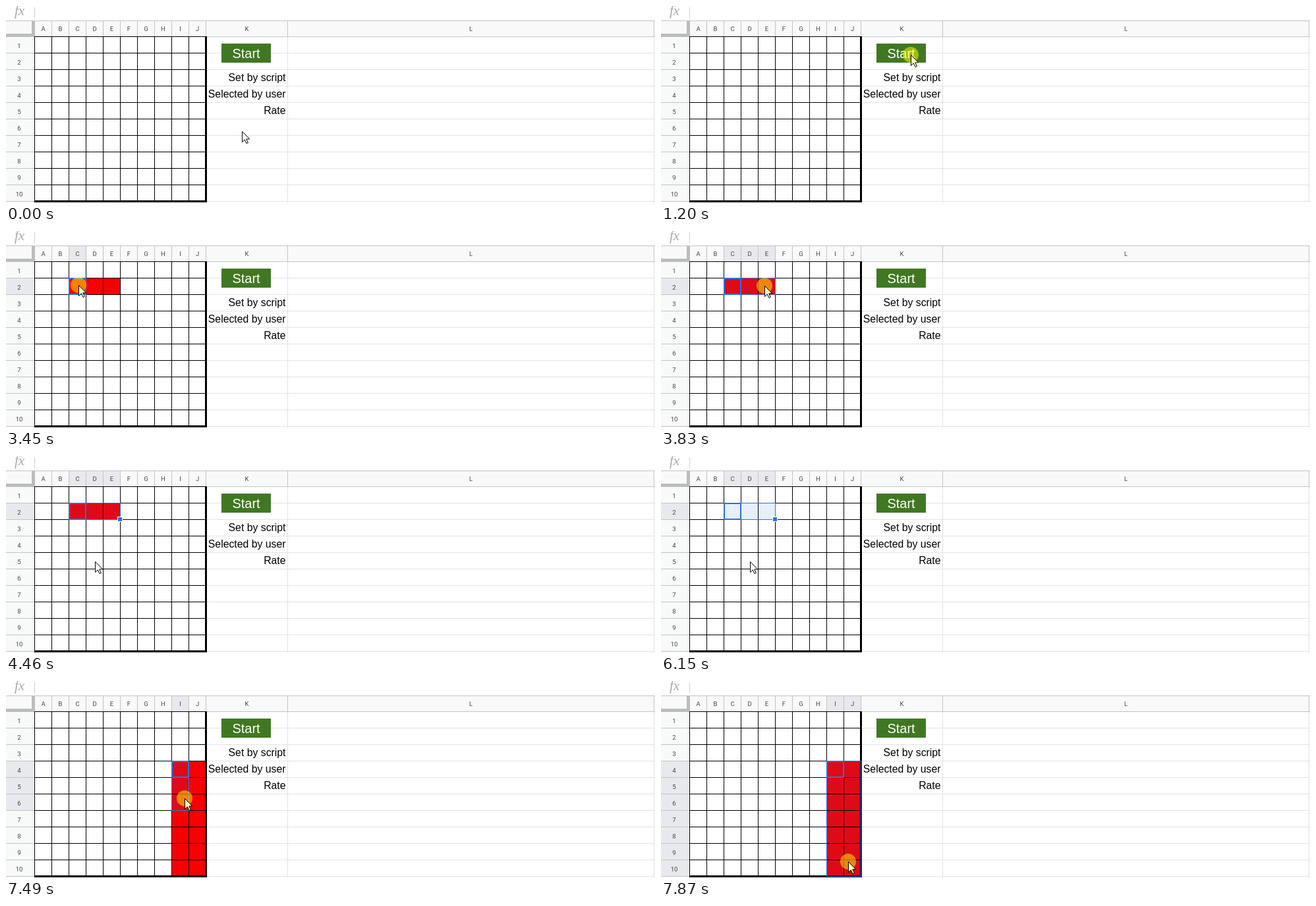
Write an HTML page that moves like this. It is 985 by 299 pixels and loops after 8 s.

```html
<!DOCTYPE html>
<html lang="en">
<head>
<meta charset="utf-8">
<title>Spreadsheet range selection</title>
<style>
  html, body { margin: 0; width: 100%; height: 100%; overflow: hidden; background: #fff; }
  svg { display: block; width: 985px; height: 299px; }
  .crisp { shape-rendering: crispEdges; }
  .head { font: 9.5px Roboto, Arial, sans-serif; fill: #444; text-anchor: middle; }
  .cell { font: 15.8px "Liberation Sans", Arial, sans-serif; text-anchor: end; }
  .button { font: 20px "Liberation Sans", Arial, sans-serif; fill: #fff; text-anchor: middle; }
  .fx { font: italic 21px "Liberation Serif", Times, serif; fill: #aaa; }
</style>
</head>
<body>
<svg id="stage" viewBox="0 0 985 299"></svg>
<script>
const LOOP = 8000, COLS = 10, ROWS = 10, CW = 26, RH = 25;
const BLUE = '#2b6fe3', HEAD = '#f8faf9', HEAD_ON = '#e8e9ee', LINE = '#c2c4c3', GRID = '#e2e3e3';
const stage = document.getElementById('stage');
const colX = c => 43 + c * CW;
const rowY = r => 46 + r * RH;

function add(tag, attrs, text, parent = stage) {
  const el = document.createElementNS('http://www.w3.org/2000/svg', tag);
  for (const k in attrs) el.setAttribute(k, attrs[k]);
  if (text !== undefined) el.textContent = text;
  return parent.appendChild(el);
}
const rect = (x, y, width, height, fill) => add('rect', { x, y, width, height, fill, class: 'crisp' });
const label = (cls, x, y, text) => add('text', { class: cls, x, y }, text);
const show = (el, on) => el.setAttribute('visibility', on ? 'visible' : 'hidden');
function place(el, x, y, width, height) {
  Object.entries({ x, y, width, height }).forEach(([k, v]) => el.setAttribute(k, v));
}

// Formula bar and headers
label('fx', 13, 14, 'fx');
rect(43, 2, 1, 17, '#cfcfcf');
rect(0, 23, 984, 23, HEAD);
rect(0, 46, 43, 253, HEAD);
const colHeads = [], rowHeads = [];
for (let c = 0; c < COLS; c++) colHeads.push(rect(colX(c) + 1, 23, CW - 1, 23, HEAD));
for (let r = 0; r < ROWS; r++) rowHeads.push(rect(0, rowY(r) + 1, 43, RH - 1, HEAD));
rect(0, 22, 985, 1, LINE);
rect(0, 46, 985, 1, LINE);
rect(43, 23, 1, 276, LINE);
for (let c = 1; c <= COLS; c++) rect(colX(c), 23, 1, 23, LINE);
for (let r = 1; r <= ROWS; r++) {
  rect(0, rowY(r), 43, 1, LINE);
  rect(304, rowY(r), 681, 1, GRID);
}
for (const x of [427, 983]) {
  rect(x, 23, 1, 23, LINE);
  rect(x, 47, 1, 252, GRID);
}
rect(0, 42, 44, 5, '#bcbcbc');
rect(39, 23, 5, 24, '#bcbcbc');
for (let c = 0; c < COLS; c++) label('head', colX(c) + 13.5, 38, 'ABCDEFGHIJ'[c]);
label('head', 365.5, 38, 'K');
label('head', 705.5, 38, 'L');
for (let r = 0; r < ROWS; r++) label('head', 20, rowY(r) + 17.5, r + 1);

// Column K
rect(327, 57, 75, 29, '#407822');
label('button', 364.5, 79, 'Start');
['Set by script', 'Selected by user', 'Rate'].forEach((s, i) => label('cell', 424.5, 114 + i * RH, s));

// Filled ranges and board: first column, first row, last column, last row, on, off
const fills = [[2, 1, 4, 1, 2670, 6150], [8, 3, 9, 9, 6550, LOOP]].map(([c0, r0, c1, r1, on, off]) => ({
  on, off,
  el: rect(colX(c0) + 1, rowY(r0) + 1, (c1 - c0 + 1) * CW, (r1 - r0 + 1) * RH, '#f60000')
}));
const tint = rect(0, 0, 0, 0, 'rgba(14,101,235,0.1)');
for (let c = 0; c < COLS; c++) rect(colX(c), 46, 1, 251, '#000');
for (let r = 0; r < ROWS; r++) rect(43, rowY(r), 261, 1, '#000');
rect(302, 46, 3, 252, '#000');
rect(43, 295, 262, 3, '#000');

const outline = add('rect', { fill: 'none', stroke: BLUE, class: 'crisp' });
const active = add('rect', { fill: 'none', stroke: BLUE, 'stroke-width': 2, class: 'crisp' });
const knob = add('rect', { width: 7, height: 7, fill: BLUE, stroke: '#fff', class: 'crisp' });
const pointer = add('g', {});
const glow = add('circle', { r: 12, fill: '#ff0', 'fill-opacity': 0.5 }, undefined, pointer);
const arrow = add('path', {
  d: 'M.5 .5V16.5L4.3 12.9L7 18.6L9.4 17.5L6.8 11.9H11.7Z', stroke: '#000', 'stroke-width': 1
}, undefined, pointer);

// Pointer moves: first step, last step, number of steps, x, y
const moves = [
  [730, 1040, 5, 379, 74],
  [1360, 1510, 3, 317, 105],
  [1580, 1970, 6, 181, 173],
  [2920, 3370, 7, 110, 82],
  [3530, 3680, 3, 151, 82],
  [3740, 3910, 3, 159, 83],
  [4060, 4460, 6, 135, 160],
  [6870, 7170, 5, 265, 130],
  [7330, 7660, 5, 278, 243],
  [7720, 7870, 3, 284, 274]
];
const presses = [[1120, 1280], [3450, 4060], [7250, LOOP]];
const drags = [
  { from: 3450, release: 4060, until: 7250, c: 2, r: 1 },
  { from: 7250, release: LOOP, until: LOOP, c: 8, r: 3 }
];
const ease = p => p + 0.6 * p * (1 - p) * (2 * p < 1 ? 2 * p - 0.6 : 0.6);

function pointerAt(t) {
  let x = 358, y = 190;
  for (const [a, b, n, tx, ty] of moves) {
    if (t < a) break;
    const step = Math.min(n, 1 + Math.floor((t - a) / (b - a) * (n - 1) + 1e-6));
    const p = ease(step / n);
    x += (tx - x) * p;
    y += (ty - y) * p;
  }
  return [Math.round(x), Math.round(y)];
}

function drawSelection(t) {
  const d = drags.find(d => t >= d.from && t < d.until);
  let c1 = -1, r1 = -1;
  if (d) {
    const [px, py] = pointerAt(Math.min(t, d.release - 1));
    c1 = Math.floor((px - 44) / CW);
    r1 = Math.floor((py - 47) / RH);
    const x = colX(d.c), y = rowY(d.r), w = (c1 - d.c + 1) * CW, h = (r1 - d.r + 1) * RH;
    place(outline, x + 0.5, y + 0.5, w, h);
    place(tint, x + 1, y + 1, w, h);
    place(active, x + 1, y + 1, CW - 1, RH - 1);
    place(knob, x + w - 3.5, y + h - 3.5, 7, 7);
  }
  const many = d && (c1 > d.c || r1 > d.r);
  show(outline, many);
  show(tint, many);
  show(active, d);
  show(knob, d && t >= d.release);
  colHeads.forEach((el, c) => el.setAttribute('fill', d && c >= d.c && c <= c1 ? HEAD_ON : HEAD));
  rowHeads.forEach((el, r) => el.setAttribute('fill', d && r >= d.r && r <= r1 ? HEAD_ON : HEAD));
}

function draw(t) {
  const [x, y] = pointerAt(t);
  const down = presses.some(([a, b]) => t >= a && t < b);
  pointer.setAttribute('transform', `translate(${x} ${y})`);
  show(glow, down);
  arrow.setAttribute('fill', down ? '#ffffc8' : '#fff');
  fills.forEach(f => show(f.el, t >= f.on && t < f.off));
  drawSelection(t);
}

const start = performance.now();
function tick() {
  draw((performance.now() - start) % LOOP);
  requestAnimationFrame(tick);
}
draw(0);
requestAnimationFrame(tick);
</script>
</body>
</html>
```
